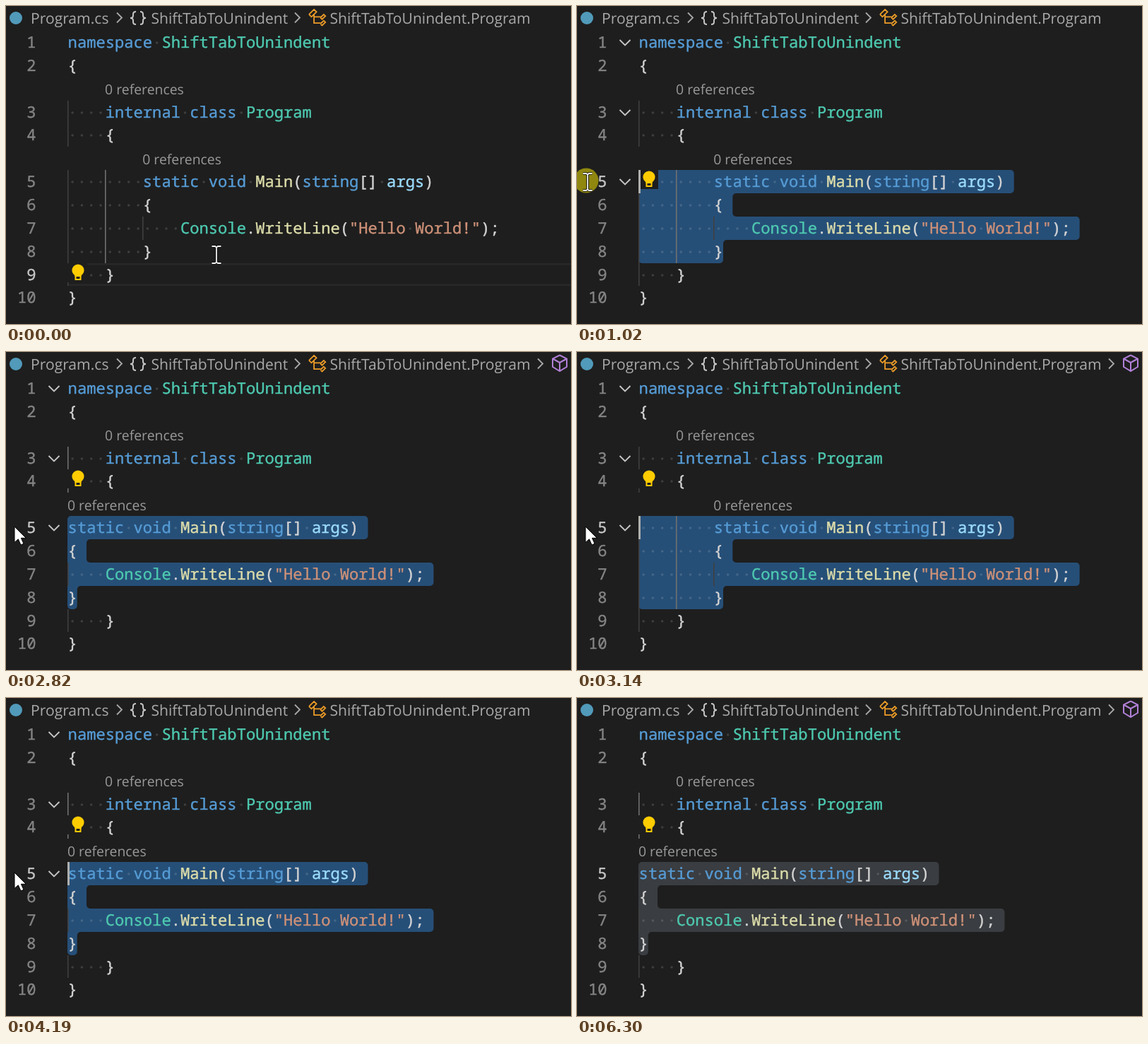
An HTML page with a canvas for the animation above (6.37 s loop, 800 by 450 pixels).

```html
<!DOCTYPE html>
<html lang="en">
<head>
<meta charset="utf-8">
<title>Shift+Tab to unindent</title>
<style>
html, body { margin: 0; width: 100%; height: 100%; overflow: hidden; background: #1e1e1e; }
canvas { display: block; width: 800px; height: 450px; }
</style>
</head>
<body>
<canvas id="stage" width="800" height="450"></canvas>
<script>
const ctx = document.getElementById('stage').getContext('2d');
const LOOP = 6370, LEFT = 87, CELL = 13.28, TOP = 35, ROW = 32.86;
const CODE_FONT = '22.13px "Noto Sans Mono", monospace';
const BG = '#1e1e1e', DIM = '#404040', BRIGHT = '#707070', GREY = '#a9a9a9';
const COLORS = {
  k: '#569cd6', c: '#4ec9b0', m: '#dcdcaa', s: '#ce9178', v: '#9cdcfe', p: '#d4d4d4'
};

// Each line: row on screen, indent level, whether it belongs to the method, coloured tokens
const LINES = [
  { row: 0, level: 0, tokens: ['k', 'namespace ', 'c', 'ShiftTabToUnindent'] },
  { row: 1, level: 0, tokens: ['p', '{'] },
  { row: 3, level: 1, tokens: ['k', 'internal class ', 'c', 'Program'] },
  { row: 4, level: 1, tokens: ['p', '{'] },
  { row: 6, level: 2, method: true, tokens: ['k', 'static void ', 'm', 'Main', 'p', '(', 'k', 'string', 'p', '[] ', 'v', 'args', 'p', ')'] },
  { row: 7, level: 2, method: true, tokens: ['p', '{'] },
  { row: 8, level: 3, method: true, tokens: ['c', 'Console', 'p', '.', 'm', 'WriteLine', 'p', '(', 's', '"Hello World!"', 'p', ');'] },
  { row: 9, level: 2, method: true, tokens: ['p', '}'] },
  { row: 10, level: 1, tokens: ['p', '}'] },
  { row: 11, level: 0, tokens: ['p', '}'] }
];
for (const l of LINES) l.size = l.tokens.filter((_, i) => i % 2).join('').length;

const clamp = (v, a, b) => Math.min(b, Math.max(a, v));
const mix = (a, b, k) => a + (b - a) * k;
const colX = c => LEFT + c * CELL;
const rowY = r => Math.round(TOP + r * ROW);
const within = (t, spans) => spans.some(([a, b]) => t >= a && t < b);

// Value of the last [time, value] pair already reached
const latest = (t, pairs) => pairs.reduce((v, [at, next]) => t >= at ? next : v, pairs[0][1]);

const EDITS = [[0, 0], [2010, 1], [2280, 2], [2950, 1], [3140, 0], [3730, 1], [3930, 2]];
const LENS = EDITS.map(([at, n]) => [at === 2010 ? 2080 : at, n]);
const BULB = [[0, 10], [950, 6], [2540, 4], [3400, 6], [4190, 4]];
const CARET_OFF = [[0, 240], [1220, 1750], [2820, 2950], [3600, 3730], [4390, 4940], [5410, 5960], [6300, LOOP]];

function dragStep(t) {
  return clamp(Math.floor((t - 70) / 85.7) + 1, 0, 8) + clamp(Math.floor((t - 750) / 67.4) + 1, 0, 5);
}

function mouseAt(t) {
  if (t < 1160) {
    const path = [[0, 298, 352], [3, 230, 349], [8, 40, 282], [13, 15, 249]];
    const step = dragStep(t);
    const i = step < 3 ? 0 : step < 8 ? 1 : 2;
    const [a, x0, y0] = path[i], [b, x1, y1] = path[i + 1];
    const k = (step - a) / (b - a);
    return { kind: 'beam', x: mix(x0, x1, k), y: mix(y0, y1, k), pressed: step >= 3 };
  }
  if (t >= 5820) return null;
  const k = clamp(Math.floor((t - 5400) / 69), 0, 5) / 5;
  return { kind: 'arrow', x: mix(12, 75, k), y: mix(247, 293, k) };
}

// Caret position while the selection is dragged, then fixed at the method start
function caretAt(t, mouse) {
  if (t >= 1160) return { line: 4, col: 0 };
  if (!mouse.pressed) return { line: 8, col: 5 };
  const row = clamp(Math.floor((mouse.y - TOP) / ROW), 6, 9);
  const line = LINES.findIndex(l => l.row === row);
  const end = LINES[line].level * 4 + LINES[line].size;
  return { line, col: clamp(Math.round((mouse.x - LEFT) / CELL), 0, end) };
}

function stroke(color, width, ...paths) {
  ctx.strokeStyle = color;
  ctx.lineWidth = width;
  ctx.beginPath();
  for (const p of paths) p.forEach(([x, y], i) => i ? ctx.lineTo(x, y) : ctx.moveTo(x, y));
  ctx.stroke();
}

function box(color, x, y, w, h) {
  ctx.fillStyle = color;
  ctx.fillRect(x, y, w, h);
}

function disc(color, x, y, r) {
  ctx.fillStyle = color;
  ctx.beginPath();
  ctx.arc(x, y, r, 0, 7);
  ctx.fill();
}

function label(text, x, y, size, color) {
  ctx.font = size + 'px "Open Sans", sans-serif';
  ctx.fillStyle = color;
  ctx.fillText(text, x, y);
}

// A hairline outline gives the code its slightly heavier weight
function codeText(text, x, row, color) {
  const y = rowY(row);
  ctx.font = CODE_FONT;
  ctx.strokeStyle = color;
  ctx.lineWidth = 0.4;
  for (const ch of text) {
    if (ch === ' ') disc('rgba(227,228,226,.16)', x + CELL / 2 + 0.5, y + 17, 1.8);
    else {
      ctx.fillStyle = color;
      ctx.fillText(ch, x + 0.6, y + 24);
      ctx.strokeText(ch, x + 0.6, y + 24);
    }
    x += CELL;
  }
  return x;
}

function classIcon() {
  const at = pts => pts.map(([x, y]) => [426.5 + x * 1.8, 2.5 + y * 1.75]);
  const small = y => at([[10.4, y], [13, y - 2.6], [14.3, y - 1.3], [11.7, y + 1.3], [10.4, y]]);
  stroke('#ee9d28', 1.8,
    at([[1.4, 5.35], [5.35, 1.4], [7.3, 3.35], [3.35, 7.3], [1.4, 5.35]]),
    at([[5.35, 5.3], [5.35, 12.35], [10.5, 12.35]]),
    at([[5.35, 7.35], [10.5, 7.35]]),
    small(8), small(13));
}

function breadcrumbs(extra) {
  const arrow = x => stroke(GREY, 1.8, [[x, 9.5], [x + 7, 16.5], [x, 23.5]]);
  disc('#519aba', 14, 17, 9);
  label('Program.cs', 35, 25, 21.1, GREY);
  arrow(157);
  ctx.strokeStyle = '#c5c5c5';
  ctx.lineWidth = 2;
  for (const side of [-1, 1]) {
    const x = d => 187 + side * d;
    ctx.beginPath();
    ctx.moveTo(x(3), 8);
    ctx.quadraticCurveTo(x(7), 8, x(7), 11.5);
    ctx.lineTo(x(7), 13.5);
    ctx.quadraticCurveTo(x(7), 17, x(11), 17);
    ctx.quadraticCurveTo(x(7), 17, x(7), 20.5);
    ctx.lineTo(x(7), 22.5);
    ctx.quadraticCurveTo(x(7), 26, x(3), 26);
    ctx.stroke();
  }
  label('ShiftTabToUnindent', 205.5, 25, 21.1, GREY);
  arrow(409);
  classIcon();
  label('ShiftTabToUnindent.Program', 458.5, 25, 21.1, GREY);
  if (!extra) return;
  arrow(753);
  stroke('#b180d7', 2,
    [[784, 4.5], [794, 9.5], [794, 21], [784, 27], [774, 21], [774, 9.5], [784, 4.5]],
    [[774, 9.5], [784, 15], [794, 9.5]], [[784, 15], [784, 27]]);
}

function roundedShape(points, r, color) {
  const pts = points.filter((p, i) => {
    const q = points[(i + 1) % points.length];
    return Math.hypot(p[0] - q[0], p[1] - q[1]) > 0.5;
  });
  const n = pts.length;
  ctx.fillStyle = color;
  ctx.beginPath();
  ctx.moveTo((pts[n - 1][0] + pts[0][0]) / 2, (pts[n - 1][1] + pts[0][1]) / 2);
  pts.forEach((p, i) => {
    const q = pts[(i + 1) % n], o = pts[(i + n - 1) % n];
    const room = Math.min(Math.hypot(p[0] - q[0], p[1] - q[1]), Math.hypot(p[0] - o[0], p[1] - o[1])) / 2;
    ctx.arcTo(p[0], p[1], q[0], q[1], Math.min(r, room));
  });
  ctx.closePath();
  ctx.fill();
}

function selection(caret, shift, color) {
  const right = [], left = [];
  for (let i = caret.line; i <= 7; i++) {
    const l = LINES[i], y0 = rowY(l.row), y1 = rowY(l.row + 1);
    const end = (l.level - shift) * 4 + l.size + (i < 7 ? 1 : 0);
    const x0 = colX(i === caret.line ? caret.col : 0), x1 = colX(end) + 0.5;
    if (x1 - x0 < 1) return;
    right.push([x1, y0], [x1, y1]);
    left.unshift([x0, y1], [x0, y0]);
  }
  // Straight joints between rows need no corner
  const all = [...right, ...left];
  const corners = all.filter((p, i) => {
    const a = all[(i + all.length - 1) % all.length], b = all[(i + 1) % all.length];
    return !(a[0] === p[0] && b[0] === p[0]);
  });
  roundedShape(corners, 5, color);
}

function guides(levels, caret, shift) {
  LINES.forEach((l, i) => {
    for (let g = 0; g < levels[i]; g++) {
      let active;
      if (caret.line === 8) active = g === 1;
      else if (caret.line > 4) active = g === 2;
      else if (shift === 0) active = g === 1;
      else active = g === 0 && (shift === 1 || i < 4);
      const y = rowY(l.row);
      box(active ? BRIGHT : DIM, Math.round(colX(g * 4)), y, 1.6, rowY(l.row + 1) - y);
    }
  });
}

function bulb(row) {
  const y = rowY(row), gold = '#ffcc00';
  box(BG, 87, y, 28, 27);
  disc(gold, 102, y + 10, 8.6);
  box(gold, 97.5, y + 14, 9, 5);
  stroke(gold, 2, [[98.5, y + 17], [98.5, y + 23], [105.5, y + 23], [105.5, y + 17]]);
}

function pointer({ kind, x, y, pressed }) {
  if (pressed) disc('rgba(255,240,0,.5)', x - 2, y - 2, 17.5);
  if (kind === 'beam') {
    const shape = [
      [[x - 6.5, y - 12], [x - 2, y - 12], [x, y - 10.5], [x + 2, y - 12], [x + 6.5, y - 12]],
      [[x, y - 10.5], [x, y + 10.5]],
      [[x - 6.5, y + 12], [x - 2, y + 12], [x, y + 10.5], [x + 2, y + 12], [x + 6.5, y + 12]]
    ];
    stroke('#111', 3.6, ...shape);
    stroke('#f0f0f0', 1.8, ...shape);
    return;
  }
  const outline = [[0, 0], [0, 22.5], [5.3, 17.8], [9, 26], [13, 24.3], [9.4, 16.3], [16.3, 16.3]];
  ctx.beginPath();
  for (const [dx, dy] of outline) ctx.lineTo(x + dx, y + dy);
  ctx.closePath();
  ctx.fillStyle = '#fff';
  ctx.fill();
  ctx.strokeStyle = '#000';
  ctx.lineWidth = 1;
  ctx.stroke();
}

function draw(t) {
  const shift = latest(t, EDITS), mouse = mouseAt(t), caret = caretAt(t, mouse);
  const levels = LINES.map(l => l.level - (l.method ? shift : 0));
  box(BG, 0, 0, 800, 450);
  breadcrumbs(within(t, [[2680, 3460], [4330, LOOP]]));

  if (caret.line === 8) {
    box('#282828', LEFT, 364, 713, 2.5);
    box('#282828', LEFT, 393.5, 713, 2.5);
  } else {
    selection(caret, shift, t < 6300 ? '#264f78' : '#3a3d41');
  }
  guides(levels, caret, shift);

  LINES.forEach((l, i) => {
    const num = String(i + 1);
    codeText(num, 42 - num.length * CELL, l.row, i === caret.line ? '#c6c6c6' : '#858585');
    let x = codeText(' '.repeat(levels[i] * 4), LEFT, l.row);
    for (let k = 0; k < l.tokens.length; k += 2) {
      x = codeText(l.tokens[k + 1], x, l.row, COLORS[l.tokens[k]]);
    }
  });
  label('0 references', colX(4), rowY(2) + 24, 19.4, '#999');
  label('0 references', colX(8 - latest(t, LENS) * 4), rowY(5) + 25, 19.4, '#999');

  ctx.globalAlpha = clamp((t - 740) / 250, 0, 1) * clamp((5960 - t) / 200, 0, 1);
  for (const r of [0, 3, 6]) {
    const y = rowY(r) + 13;
    stroke('#c5c5c5', 1.9, [[60.5, y], [68, y + 7.5], [75.5, y]]);
  }
  ctx.globalAlpha = 1;

  bulb(latest(t, BULB));
  if (!within(t, CARET_OFF)) {
    const r = LINES[caret.line].row;
    box('#aeafad', Math.round(colX(caret.col)), rowY(r), 3, rowY(r + 1) - rowY(r));
  }
  if (mouse) pointer(mouse);
}

function tick() {
  draw(performance.now() % LOOP);
  requestAnimationFrame(tick);
}
ctx.textRendering = 'geometricPrecision';
tick();
</script>
</body>
</html>
```
